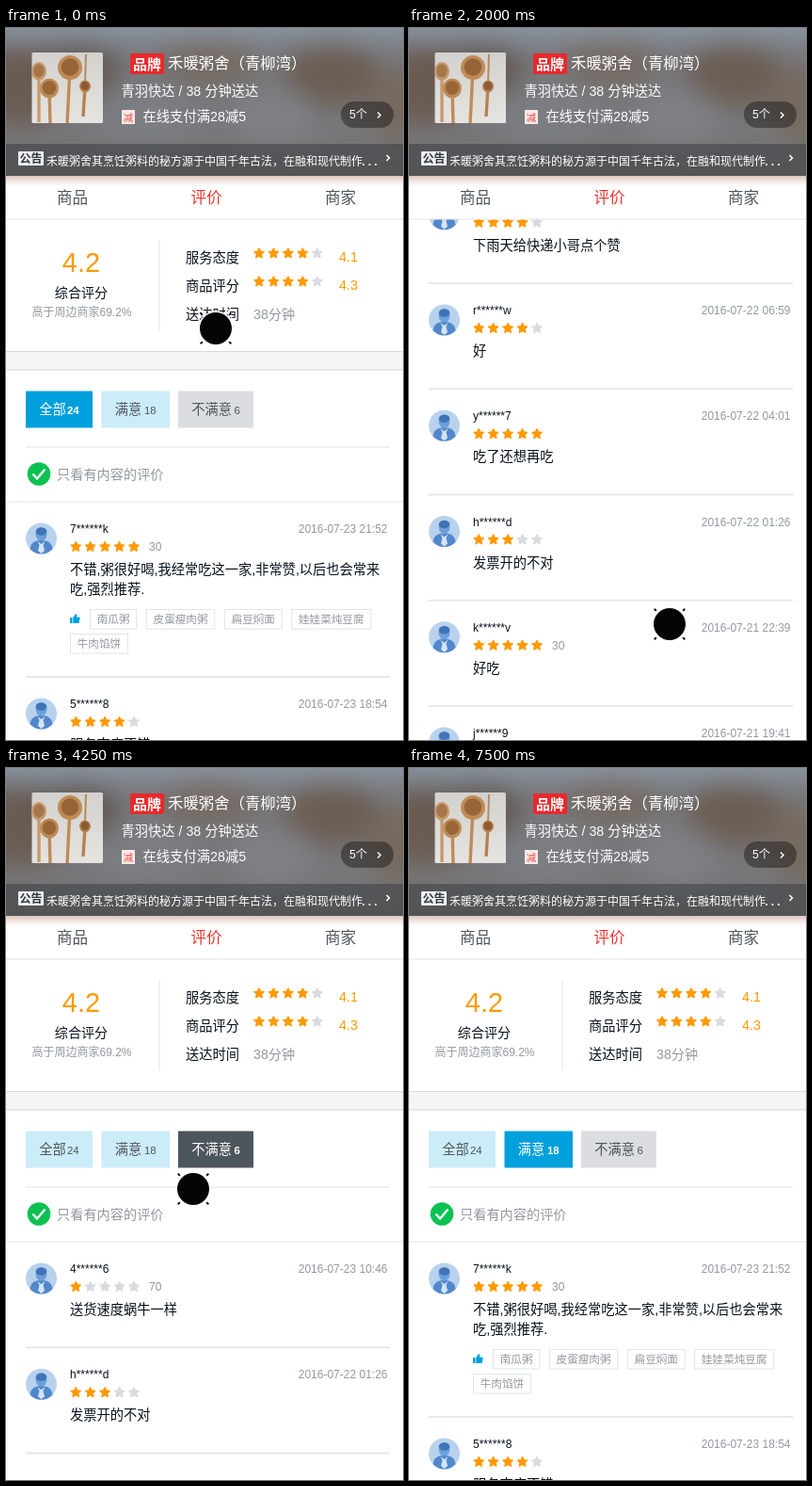
Animation of 422 by 756 pixels, one loop 7.75 s. Source, as an HTML page:

```html
<!DOCTYPE html>
<html lang="zh-CN">
<head>
<meta charset="utf-8">
<title>评价</title>
<style>
html, body { margin: 0; width: 100%; height: 100%; overflow: hidden; background: #fff; }
svg { display: block; width: 100vw; height: 100vh; }
text { font-family: 'Liberation Sans', 'Noto Sans CJK SC', 'Noto Sans CJK', sans-serif; white-space: pre; }
</style>
</head>
<body>
<svg id="stage" viewBox="0 0 422 756" xmlns="http://www.w3.org/2000/svg"></svg>
<script>
const INK = '#07111b', GREY = '#93999f', SLATE = '#4d555d', ORANGE = '#ff9900', BLUE = '#00a0dc';
const LOOP = 7750, STEP = 250, LIST_TOP = 503, ROW = 112.25;

const text = (x, y, str, size, fill, extra = '') =>
  `<text x="${x}" y="${y}" font-size="${size}" fill="${fill}" ${extra}>${str}</text>`;
const rect = (x, y, w, h, fill, extra = '') =>
  `<rect x="${x}" y="${y}" width="${w}" height="${h}" fill="${fill}" ${extra}/>`;
const circle = (x, y, r, fill, extra = '') =>
  `<circle cx="${x}" cy="${y}" r="${r}" fill="${fill}" ${extra}/>`;
const ellipse = (x, y, rx, ry, fill) =>
  `<ellipse cx="${x}" cy="${y}" rx="${rx}" ry="${ry}" fill="${fill}"/>`;
const line = (d, stroke, width, extra = '') =>
  `<path d="${d}" fill="none" stroke="${stroke}" stroke-width="${width}" ${extra}/>`;
const MID = 'text-anchor="middle"', END = 'text-anchor="end"', BOLD = 'font-weight="700"', MEDIUM = 'font-weight="500"';

function star(cx, cy, fill) {
  const pts = Array.from({ length: 10 }, (_, i) => {
    const a = i * Math.PI / 5 - Math.PI / 2, r = i % 2 ? 2.9 : 5.8;
    return (cx + r * Math.cos(a)).toFixed(2) + ',' + (cy + 0.4 + r * Math.sin(a)).toFixed(2);
  });
  return `<polygon points="${pts.join(' ')}" fill="${fill}" stroke="${fill}" stroke-linejoin="round"/>`;
}
const stars = (x, y, score) =>
  [0, 1, 2, 3, 4].map(i => star(x + i * 15.45, y, i < score ? ORANGE : '#d9dbe0')).join('');

// name, date, score, lines, delivery minutes, tags
const reviews = [
  ['7******k', '07-23 21:52', 5, ['不错,粥很好喝,我经常吃这一家,非常赞,以后也会常来', '吃,强烈推荐.'], 30,
    ['南瓜粥', '皮蛋瘦肉粥', '扁豆焖面', '娃娃菜炖豆腐', '牛肉馅饼']],
  ['5******8', '07-23 18:54', 4, ['服务态度不错'], '', ['扁豆焖面']],
  ['4******6', '07-23 10:46', 1, ['送货速度蜗牛一样'], 70],
  ['e******u', '07-23 08:33', 5, ['很喜欢的粥店']],
  ['5******8', '07-22 21:47', 4, ['量给的还可以']],
  ['b******q', '07-22 19:36', 5, ['孩子喜欢吃这家'], '', ['南瓜粥']],
  ['6******1', '07-22 17:05', 4, ['粥挺好吃的']],
  ['g******x', '07-22 13:20', 5, ['送货速度很快'], 40],
  ['v******4', '07-22 10:28', 4, ['下雨天给快递小哥点个赞']],
  ['r******w', '07-22 06:59', 4, ['好']],
  ['y******7', '07-22 04:01', 5, ['吃了还想再吃']],
  ['h******d', '07-22 01:26', 3, ['发票开的不对']],
  ['k******v', '07-21 22:39', 5, ['好吃'], 30],
  ['j******9', '07-21 19:41', 4, ['还不错吧']],
  ['w******2', '07-21 16:12', 5, ['味道很好']]
];

const avatar = y => `<g transform="translate(37.5 ${y})">` +
  circle(0, 0, 16.5, '#b8d2ee') +
  `<path d="M-12 11.3C-11 3-5 2 0 2S11 3 12 11.3A16.5 16.5 0 0 1-12 11.3Z" fill="#5288cb"/>` +
  ellipse(0, -4.5, 6, 7, '#6d9fdb') + ellipse(0, -7.5, 5.8, 4.2, '#3f74b8') +
  `<path d="M-4 3L0 6 4 3 2 7 3.5 13 0 16-3.5 13-2 7Z" fill="#d5e5f7"/></g>`;

const thumb = y => `<g transform="translate(68 ${y})" fill="${BLUE}">` + rect(0, 4.5, 2.5, 6, BLUE) +
  `<path d="M3.3 4.5L5.8 0.8 7.5 1.2 7 4H10.2L10.6 5.5 9.5 10.5H3.3Z"/></g>`;

function tagBoxes(tags, y) {
  let x = 89, out = thumb(y + 4.5);
  for (const tag of tags) {
    const w = tag.length * 11.6 + 15.5;
    if (x + w > 406) { x = 68; y += 26; }
    out += rect(x + 0.5, y + 0.5, w - 1, 20.5, '#fff', 'stroke="#e1e3e6"') +
      text(x + w / 2, y + 15.2, tag, 11.6, GREY, MID);
    x += w + 9.5;
  }
  return out;
}

function reviewList(items) {
  let top = LIST_TOP, out = '';
  for (const [name, date, score, lines, delivery = '', tags] of items) {
    out += avatar(top + 39) + text(68, top + 33, name, 12, INK) +
      text(405.5, top + 33, '2016-' + date, 12, GREY, END) +
      stars(74.2, top + 47.5, score) + text(152, top + 52, delivery, 12, GREY);
    lines.forEach((s, i) => out += text(68, top + 77 + i * 21, s, 14.25, INK));
    let h = ROW + (lines.length - 1) * 21;
    if (tags) {
      out += tagBoxes(tags, top + 93 + (lines.length - 1) * 21);
      h += tags.length > 4 ? 52.75 : 27;
    }
    top += h;
    out += rect(21, top - 1, 387, 2, '#e6e8ea');
  }
  return out;
}

const lists = [reviews, reviews.filter(r => r[2] > 3), reviews.filter(r => r[2] < 4)];

// x, width, label, count x, count, idle colour, active colour
const filters = [
  [21, 71, '全部', 65, 24, '#ccecf8', BLUE],
  [101.5, 72.5, '满意', 147, 18, '#ccecf8', BLUE],
  [183, 80, '不满意', 242.5, 6, '#dbdde0', SLATE]
];
const filterButton = ([x, w, label, cx, count, idle, active], on) => {
  const ink = on ? '#fff' : SLATE;
  return rect(x, 385.5, w, 39, on ? active : idle) +
    text(x + 14.2, 409.5, label, 14.25, ink, on ? MEDIUM : '') + text(cx, 409.5, count, 11.4, ink, on ? BOLD : '');
};

const spoon = (x, y, rx, ry, x2, y2, fill, dark) =>
  line(`M${x} ${y}L${x2} ${y2}`, fill, 3.4) + ellipse(x, y, rx, ry, fill) +
  ellipse(x, y - 0.5, rx * 0.72, ry * 0.72, dark);

const chevron = (x, y) => line(`M${x} ${y - 3}l3 3-3 3`, '#fff', 1.5);

const overview =
  text(80, 259, '4.2', 29, ORANGE, MID) + text(80, 285.5, '综合评分', 14.1, INK, MID) +
  text(80.5, 306, '高于周边商家69.2%', 12, GREY, MID) + rect(162.5, 225, 1, 96, '#e1e4e7') +
  text(191, 248.5, '服务态度', 14.25, INK) + stars(269, 239, 4) + text(354, 248, '4.1', 14.4, ORANGE) +
  text(191, 278.5, '商品评分', 14.25, INK) + stars(269, 269, 4) + text(354, 278, '4.3', 14.4, ORANGE) +
  text(191, 309, '送达时间', 14.25, INK) + text(263, 309, '38分钟', 14.2, GREY) +
  rect(0, 343, 422, 20.5, '#f3f5f7') + rect(0, 343, 422, 1, '#d5d9dc') + rect(0, 362.5, 422, 1, '#d5d9dc');

const controls =
  filters.map((f, i) => [0, 1].map(on => `<g class="f${i}${on}">${filterButton(f, on)}</g>`).join('')).join('') +
  rect(21, 444.5, 387, 1, '#e1e4e7') + circle(35, 473.5, 12.3, '#0bc251') +
  line('M28.5 473.5L33 478.5 41.5 468.5', '#fff', 2.4) +
  text(54, 479, '只看有内容的评价', 14.2, GREY) + rect(0, 502.5, 422, 1, '#e1e4e7');

const backdrop = `<g clip-path="url(#head)">` + rect(0, 0, 422, 157, '#77787b') +
  `<g filter="url(#soft)">` + rect(-40, -40, 502, 52, '#8b95a2') +
  ellipse(15, 60, 55, 45, '#6a5c53') + ellipse(75, 45, 45, 32, '#62574f') +
  ellipse(215, 35, 55, 26, '#756a63') + ellipse(345, 48, 50, 36, '#6c5d52') +
  ellipse(150, 95, 55, 35, '#7c7e82') + ellipse(285, 95, 45, 30, '#7f8185') +
  ellipse(420, 80, 35, 40, '#76695f') + rect(-40, 125, 502, 60, '#75716f') + `</g>` +
  rect(0, 123, 422, 34, '#07111b', 'opacity=".3"') + `</g>`;

const photo = rect(27.5, 26, 75.5, 75, 'url(#paper)', 'rx="1.5"') + `<g clip-path="url(#shot)">` +
  spoon(35, 46, 8, 10, 35, 100, '#c69a6c', '#a5764a') + spoon(46, 64, 10, 10.5, 47, 102, '#bd8c58', '#9a6638') +
  line('M85 28L84 60', '#b78a5c', 2) + spoon(84, 62, 6, 6.5, 82, 94, '#b5824f', '#8d5b33') +
  spoon(68, 42, 13, 13, 65, 102, '#bf8c56', '#97643a') + `</g>`;

const header =
  rect(0, 157, 422, 46, '#fff') + rect(0, 157, 422, 13, 'url(#glow)') + rect(0, 202.5, 422, 1, '#e1e4e7') +
  ['商品', '评价', '商家'].map((s, i) => text([70.5, 213, 355.5][i], 186, s, 16.6, i === 1 ? '#f0322d' : SLATE, MID)).join('') +
  backdrop + photo +
  rect(132, 27, 36, 22, '#e8292c', 'rx="1.5"') + text(150, 43.5, '品牌', 15, '#fff', MID + ' ' + BOLD) +
  text(172, 42.5, '禾暖粥舍（青柳湾）', 16.4, '#fff', MEDIUM) +
  text(122.5, 72, '青羽快达 / 38 分钟送达', 14.25, '#fff') +
  rect(123, 87, 14, 15, '#fbe9e7') + text(130, 98.5, '减', 10.5, '#e5534b', MID) +
  text(145.5, 99, '在线支付满28减5', 14.3, '#fff') +
  rect(356, 78, 56, 28, '#000', 'rx="14" opacity=".38"') + text(365, 96, '5个', 12.2, '#fff') + chevron(395, 92.5) +
  rect(13, 131, 27, 15, '#eef0f2', 'rx="1"') + text(26.5, 143, '公告', 12, '#33383d', MID + ' ' + BOLD) +
  text(43, 146, '禾暖粥舍其烹饪粥料的秘方源于中国千年古法，在融和现代制作', 12, '#fff') +
  [380, 386.5, 393].map(x => circle(x, 145, 1.1, '#fff')).join('') + chevron(404.5, 138);

const specks = [45, 135, 225, 315].map(a =>
  `<g transform="rotate(${a})">${rect(19.5, -4, 2.5, 8, '#fff')}${rect(20, -1, 3, 2, '#111')}</g>`).join('');

document.getElementById('stage').innerHTML = `<defs>
  <filter id="soft" x="-20%" y="-50%" width="140%" height="200%"><feGaussianBlur stdDeviation="14"/></filter>
  <clipPath id="head">${rect(0, 0, 422, 157, '#000')}</clipPath>
  <clipPath id="shot">${rect(27.5, 26, 75.5, 75, '#000', 'rx="1.5"')}</clipPath>
  <linearGradient id="paper" x2="0" y2="1"><stop stop-color="#d3d1ce"/><stop offset="1" stop-color="#e6e4e1"/></linearGradient>
  <linearGradient id="glow" x2="0" y2="1"><stop stop-color="#c0998a" stop-opacity=".6"/><stop offset="1" stop-color="#f4e4df" stop-opacity="0"/></linearGradient>
</defs>` + rect(0, 0, 422, 756, '#fff') +
  `<g id="scroll">${overview}${controls}${lists.map(l => `<g class="list">${reviewList(l)}</g>`).join('')}</g>` + header +
  `<g id="pointer">${circle(0, 0, 18.8, '#fff', 'opacity=".85"')}${specks}${circle(0, 0, 17, '#050505')}</g>`;

const scroller = document.getElementById('scroll');
const pointer = document.getElementById('pointer');
const listNodes = document.querySelectorAll('.list');
const buttonNodes = filters.map((_, i) => [0, 1].map(on => document.querySelector(`.f${i}${on}`)));

// time, x, y
const path = [
  [0, 223, 319], [750, 246, 350], [1000, 251, 352], [1250, 262, 185], [1500, 266, 230], [2000, 277, 633],
  [2250, 262, 640], [2750, 176, 460], [3000, 158, 431], [3250, 150, 418], [3750, 222, 416], [4250, 199, 447],
  [4750, 145, 420], [5250, 62, 418], [5750, 185, 427], [6500, 222, 414], [7000, 140, 415]
];
// time, offset
const offsets = [
  [0, 0], [1000, 0], [1250, 165], [1500, 1000], [1750, 1557], [2000, 1370], [2250, 420],
  [2500, -12], [2750, -4], [3000, -1], [3250, 0]
];
// time, selected filter
const picks = [[0, 0], [3250, 1], [3750, 2], [4750, 1], [5250, 0], [6500, 2], [7000, 1]];

function at(keys, t) {
  const i = keys.findIndex(k => k[0] > t);
  if (i < 0) return keys[keys.length - 1].slice(1);
  const a = keys[i - 1], b = keys[i], p = (t - a[0]) / (b[0] - a[0]);
  return a.slice(1).map((v, j) => v + (b[j + 1] - v) * p);
}

const show = (node, on) => node.setAttribute('display', on ? 'inline' : 'none');

function render(ms) {
  const t = Math.floor(ms % LOOP / STEP) * STEP;
  const pick = picks.filter(k => k[0] <= t).pop()[1];
  scroller.setAttribute('transform', `translate(0 ${-at(offsets, t)[0]})`);
  pointer.setAttribute('transform', `translate(${at(path, t).join(' ')})`);
  show(pointer, t < 7500);
  listNodes.forEach((node, i) => show(node, i === pick));
  buttonNodes.forEach((pair, i) => pair.forEach((node, on) => show(node, (i === pick) === !!on)));
}

const start = performance.now();
function tick() {
  render(performance.now() - start);
  requestAnimationFrame(tick);
}
tick();
</script>
</body>
</html>
```
